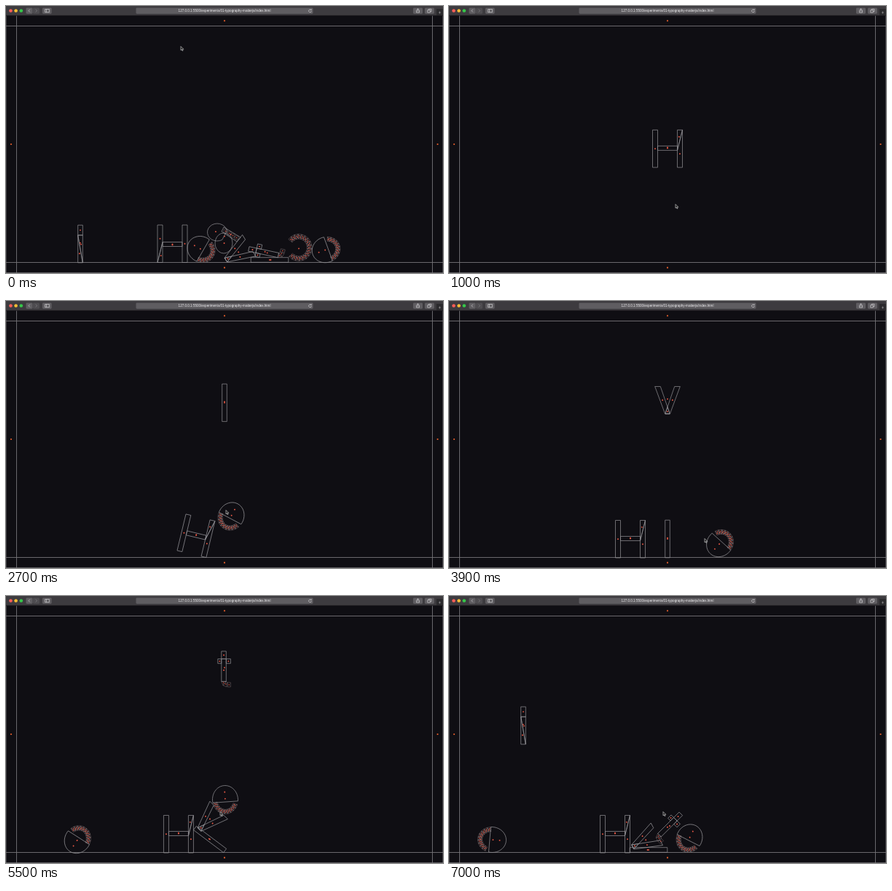
An HTML page that plays this animation: 600x367 px, repeating every 7100 ms.

```html
<!DOCTYPE html>
<html lang="en">
<head>
<meta charset="utf-8">
<title>Typography experiment</title>
<style>
  html, body { margin: 0; width: 100%; height: 100%; overflow: hidden; background: #0f0e13; }
  svg { display: block; width: 100vw; height: 100vh; }
  text { font-family: "Liberation Sans", Arial, sans-serif; }
  .wire { fill: none; stroke: #949397; stroke-width: .7; stroke-linejoin: round; }
  .mesh { stroke: #7a686a; stroke-width: .5; }
  .wall { fill: none; stroke: #747377; stroke-width: .9; }
  .icon { fill: none; stroke: #d0cfd1; stroke-width: .7; }
  .dot { fill: #ee5a46; }
  .pin { fill: #e8602c; }
</style>
</head>
<body>
<svg viewBox="0 0 600 367" preserveAspectRatio="none">
  <rect width="600" height="367" fill="#0f0e13"/>
  <g id="world">
    <path class="wall" d="M0 27.5H600M0 352.5H600M14.5 13V367M585.5 13V367"/>
    <path class="wall" stroke-opacity=".6" d="M.3 13V367M599.7 13V367"/>
    <g class="pin">
      <circle cx="300" cy="20.3" r="1.1"/><circle cx="300" cy="359.7" r="1.1"/>
      <circle cx="7" cy="190" r="1.1"/><circle cx="592.6" cy="190" r="1.1"/>
    </g>
    <g id="letters"></g>
  </g>
  <g id="page">
    <rect y="13" width="600" height="354" fill="#c4c4c4"/>
    <text x="-3.2" y="39" font-size="35.2">Hentosila</text>
  </g>
  <path d="M0 366.6H600" stroke="#77757a" stroke-width=".8"/>
  <g id="bar">
    <rect width="600" height="13" fill="#3d3b3f"/>
    <path d="M0 13.2H600" stroke="#1b1a1d" stroke-width=".8"/>
    <circle cx="6.5" cy="6.5" r="2.3" fill="#fb5d57"/>
    <circle cx="13.6" cy="6.5" r="2.3" fill="#f8bd34"/>
    <circle cx="20.8" cy="6.5" r="2.3" fill="#35c84a"/>
    <g fill="#5f5d61">
      <rect x="27.5" y="2.4" width="9" height="8.3" rx="1.4"/>
      <rect x="37" y="2.4" width="9" height="8.3" rx="1.4" fill="#4e4c50"/>
      <rect x="50" y="2.4" width="12.6" height="8.3" rx="1.4"/>
      <rect x="178.5" y="2.4" width="243" height="8.3" rx="1.4"/>
      <rect x="559" y="2.4" width="13" height="8.3" rx="1.4"/>
      <rect x="575" y="2.4" width="13" height="8.3" rx="1.4"/>
    </g>
    <rect x="591" y="4" width="9" height="9" fill="#2b2a2d"/>
    <path class="icon" d="M32.8 4.6L31 6.5L32.8 8.4M53.6 4.5H59.4V8.7H53.6ZM55.5 4.5V8.7M578.8 5.6H582.3V9H578.8ZM580.3 5.4V4.2H584V7.6H582.5"/>
    <path class="icon" stroke-opacity=".4" d="M40.7 4.6L42.5 6.5L40.7 8.4"/>
    <path class="icon" stroke-opacity=".6" d="M593.9 9H597.1M595.5 7.4V10.6"/>
    <path id="share" class="icon" d="M564.5 5.8H563.5V9H567.5V5.8H566.5M565.5 7.5V3.7M564.3 4.8L565.5 3.6L566.7 4.8"/>
    <path id="reload" class="icon" d="M418.9 5.4A1.9 1.9 0 1 0 419.4 7M419.2 4.2V5.6H417.8"/>
    <path id="stop" class="icon" d="M415.8 5L418.8 8M418.8 5L415.8 8"/>
    <text x="300" y="8.3" font-size="4.57" text-anchor="middle" fill="#efeef0">127.0.0.1:5500/experiments/01-typography-matterjs/index.html</text>
    <rect id="load" x="178.5" y="9.8" height="1" fill="#1d8fd6"/>
  </g>
  <path id="cursor" d="M0 0V6.2L1.5 4.9L2.5 7.2L3.6 6.7L2.6 4.5H4.5Z" fill="#111" stroke="#e6e6e6" stroke-width=".7"/>
</svg>
<script>
const LOOP = 7100, STEP = 100, RELOAD = 100, READY = 400;
const GRAVITY = 0.0002085; // half of px per ms squared
const $ = id => document.getElementById(id);

function add(parent, tag, attrs) {
  const el = document.createElementNS('http://www.w3.org/2000/svg', tag);
  for (const k in attrs) el.setAttribute(k, attrs[k]);
  return parent.appendChild(el);
}

// Every letter is a set of polygons; each gets an outline and a dot at its middle.
const box = (x, y, w, h) => [[x, y], [x + w, y], [x + w, y + h], [x, y + h]];
const flip = poly => poly.map(([x, y]) => [-x, y]);
const range = n => [...Array(n).keys()];

function arc(cx, cy, rx, ry, from, to, n) {
  return range(n + 1).map(i => {
    const a = (from + (to - from) * i / n) * Math.PI / 180;
    return [cx + rx * Math.cos(a), cy + ry * Math.sin(a)];
  });
}

// Curved stroke cut into pairs of triangles
function band(rx, ry, thick, from, to, n) {
  const out = arc(0, 0, rx, ry, from, to, n);
  const inn = arc(0, 0, rx - thick, ry - thick, from, to, n);
  return range(n).flatMap(i => [
    [out[i], out[i + 1], inn[i]],
    [inn[i], inn[i + 1], out[i + 1]]
  ]);
}

const leg = [[-17.3, -18.5], [-9.7, -18.5], [3.2, 19], [-3.4, 19]];
const glyphs = {
  H: { solid: [box(-20.5, -25.5, 7, 51.5), box(-13.5, -3.5, 27, 6),
    [[13.5, -25.5], [20.5, -25.5], [13.5, 2.5]],
    [[20.5, -25.5], [20.5, 26], [13.5, 26], [13.5, 2.5]]] },
  e: { solid: [arc(0, 0, 17.5, 19.5, 171, 369, 24)], mesh: band(17.5, 19.5, 6, 170, 24, 10) },
  l: { solid: [box(-3.3, -25.8, 6.6, 51.6)] },
  v: { solid: [leg, flip(leg), [[-3.3, 19], [0, 9.5], [3.3, 19]]] },
  t: { solid: [box(-4.2, -24, 6.5, 10.5), box(-9.2, -13.5, 5, 6.3), box(2.3, -13.5, 6.1, 6.3), box(-4.2, -13.5, 6.5, 31)],
    mesh: [[[-4.2, 17.5], [2.3, 17.5], [-2, 23]], [[2.3, 17.5], [4, 19], [3, 25], [-2, 23]], box(4, 19, 4.4, 6)] },
  i: { solid: [box(-3.3, -25.8, 6.6, 13.8), [[-3.3, -12], [3.3, -12], [3.3, 25.8]],
    [[-3.3, -12], [3.3, 25.8], [-3.3, 25.8]]] },
  c: { solid: [], mesh: band(18, 18.5, 6.5, 40, 320, 17) },
  a: { solid: [arc(-10, -7, 13.5, 12, 60, 350, 18), arc(-1, 8, 12, 14, 0, 360, 20),
    [[-1, -14], [22, 0], [17, 6], [-4, -8]]],
    mesh: range(4).map(k => box(-1 + k * 5, -11 + k * 3, 5, 5)) }
};

function build(name) {
  const { solid, mesh = [] } = glyphs[name];
  const g = add($('letters'), 'g', {});
  const outline = polys => polys.map(poly => 'M' + poly.map(p => p.map(v => v.toFixed(2))).join('L') + 'Z').join('');
  const dot = (cx, cy, r) => add(g, 'circle', { class: 'dot', cx, cy, r });
  const mark = (poly, r) => {
    const mean = axis => poly.reduce((sum, p) => sum + p[axis], 0) / poly.length;
    dot(mean(0), mean(1), r);
  };
  add(g, 'path', { class: 'wire mesh', d: outline(mesh) });
  add(g, 'path', { class: 'wire', d: outline(solid) });
  solid.forEach(poly => mark(poly, .95));
  mesh.forEach(poly => mark(poly, .75));
  dot(0, -1.4, .95);
  return g;
}

const smooth = u => u * u * (3 - 2 * u);
const linear = u => u;
const settle = u => 1 - (1 - u) ** 2.5;
const move = (start, end, to, ease = smooth, lift = 0) => ({ start, end, to, ease, lift });

// Carries a pose through its moves; lift adds a throw arc.
function follow(pose, moves, t) {
  for (const { start, end, to, ease, lift } of moves) {
    if (t <= start) break;
    const u = Math.min(1, (t - start) / (end - start));
    pose = pose.map((v, i) => v + (to[i] - v) * ease(u));
    pose[1] -= 4 * lift * u * (1 - u);
  }
  return pose;
}

// Each letter falls from height `from`, lands at `rest`, then gets pushed about.
const cast = [
  { name: 'H', born: 178, from: 55, rest: 327, moves: [
    move(2200, 2700, [261, 322.5, 13.5]), move(2700, 3200, [249, 327, 0]), move(4400, 6400, [228, 327, 0])] },
  { name: 'e', born: 1100, from: 50, rest: 288, moves: [
    move(2200, 2700, [309, 296, 28]), move(2700, 3800, [372, 333, 222], settle),
    move(3900, 4500, [200, 334, 157], linear, 65), move(4500, 7000, [59, 335, -265], settle)] },
  { name: 'l', born: 2008, from: 40, rest: 327, moves: [
    move(4150, 5500, [280, 334.5, -53]), move(5500, 6300, [274, 349, -90])] },
  { name: 'v', born: 3232, from: 43, rest: 286, moves: [
    move(4312, 5500, [279, 307.5, 45]), move(5500, 6400, [269, 336, 62])] },
  { name: 'e', born: 4150, from: 55, rest: 278, moves: [
    move(5184, 5500, [301, 280, -4]), move(5500, 6800, [330, 333, 27])] },
  { name: 't', born: 5134, from: 72, rest: 237, moves: [move(6024, 7000, [302, 317, 45])] },
  { name: 'i', born: 6267, from: 66, rest: 327, x: 102, moves: [] }
];

const pointer = [move(300, 1000, [311, 275]), move(2200, 2700, [302, 290]), move(2700, 3500, [351, 329]),
  move(3900, 4300, [266, 262]), move(4400, 5400, [294, 299])];

// The settled heap shown before the page reloads
const heap = [['i', 102, 327, 0], ['H', 228.5, 327, 180], ['e', 268, 334.5, -60], ['a', 300, 318, 0], ['v', 318, 339, 58],
  ['l', 362, 349, 90], ['t', 357, 338, -78], ['c', 402, 332, 178], ['e', 439.5, 335, -110]];

function place(el, [x, y, turn]) {
  el.setAttribute('transform', `translate(${x.toFixed(2)} ${y.toFixed(2)}) rotate(${turn.toFixed(2)})`);
}
const show = (el, on) => el.setAttribute('display', on ? 'inline' : 'none');

const pile = heap.map(([name, ...pose]) => {
  const el = build(name);
  place(el, pose);
  return el;
});
cast.forEach(c => { c.el = build(c.name); });

function draw(t) {
  const loading = t >= RELOAD && t < READY;
  show($('page'), loading);
  show($('world'), !loading);
  show($('load'), loading);
  show($('stop'), loading);
  show($('reload'), !loading);
  $('share').setAttribute('opacity', loading ? .3 : 1);
  $('load').setAttribute('width', t / 10);
  pile.forEach(el => show(el, t < RELOAD));
  cast.forEach(({ el, born, from, rest, x = 300, moves }) => {
    const on = t >= Math.max(READY, born);
    show(el, on);
    if (on) place(el, follow([x, Math.min(rest, from + GRAVITY * (t - born) ** 2), 0], moves, t));
  });
  const [x, y] = follow([240, 58], pointer, t);
  $('cursor').setAttribute('transform', `translate(${x.toFixed(2)} ${(y - 2.5).toFixed(2)}) scale(${loading ? .6 : .85})`);
}

const start = performance.now();
function tick() {
  const t = (performance.now() - start) % LOOP;
  draw(Math.floor(t / STEP) * STEP);
  requestAnimationFrame(tick);
}
tick();
</script>
</body>
</html>
```
